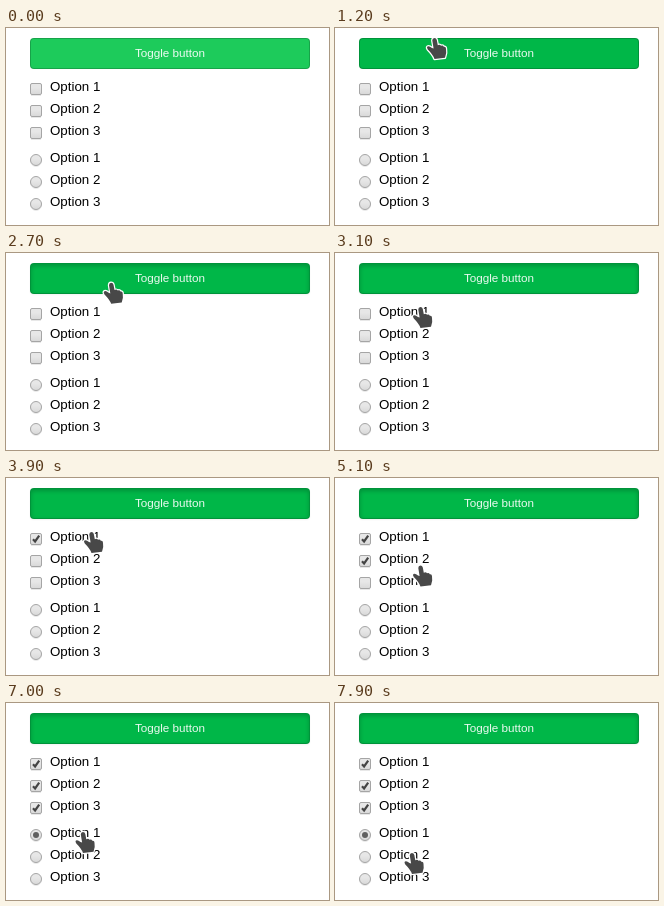
Write an HTML page that moves like this. It is 323x197 px and loops after 8 s.

```html
<!DOCTYPE html>
<html lang="en">
<head>
<meta charset="utf-8">
<title>Toggle controls</title>
<style>
  html, body { margin: 0; width: 100%; height: 100%; overflow: hidden; background: #fff; }
  #button {
    position: absolute; left: 24px; top: 10px; width: 280px; height: 31px;
    box-sizing: border-box; border: 1px solid rgba(0,0,0,.2); border-radius: 4px; background: #1dcb5b;
  }
  #button.hover { background-color: #00b748; }
  #button.down { box-shadow: inset 0 2px 4px rgba(0,0,0,.2), 0 1px 2px rgba(0,0,0,.05); }
  svg { position: absolute; left: 0; top: 0; width: 323px; height: 197px; }
  text { font: 13.333px "Liberation Sans", Arial, sans-serif; }
  #caption { font-size: 11.7px; fill: #fff; fill-opacity: .92; text-anchor: middle; }
  .face { fill: url(#idle); stroke: #a5a5a5; }
  .shade { fill: none; stroke: #000; stroke-opacity: .09; }
  .pressed .face { fill: url(#active); stroke: #999; }
  .mark { visibility: hidden; }
  .checked .mark { visibility: visible; }
</style>
</head>
<body>
<div id="button"></div>
<svg viewBox="0 0 323 197">
  <defs>
    <linearGradient id="idle" x2="0" y2="1">
      <stop offset=".38" stop-color="#e7e7e7"/><stop offset="1" stop-color="#d8d8d8"/>
    </linearGradient>
    <linearGradient id="active" x2="0" y2="1">
      <stop offset=".38" stop-color="#dddddd"/><stop offset="1" stop-color="#cdcdcd"/>
    </linearGradient>
  </defs>
  <text id="caption" x="164" y="29">Toggle button</text>
  <g id="options"></g>
  <path id="hand" fill="#484848" stroke="#fff" stroke-width="2.4" stroke-linejoin="round" paint-order="stroke"
    d="M-.6 0Q1.4 0 1.8 2L2.8 7.2Q5 6.2 6 7.8Q8 7 8.8 8.8Q11 8.4 11 10.8L11.2 15L10 19.8L-.5 21Q-2 16.8 -7.2 11.6Q-8.6 9.6 -7.6 8.6Q-6 7.4 -3 10L-1.4 10.6L-2.7 2.5Q-2.7 .2 -.6 0Z"/>
</svg>
<script>
const LOOP = 8000, TICK = 100, PRESS_DELAY = 200;

// The pointer enters, rests on the button, then visits the options in order.
const entry = { x: 100, y: 10 };
const stops = [
  { start: 1200, end: 1500, x: 108, y: 27 },
  { start: 2600, end: 3100, x: 86, y: 54, check: 3900 },
  { start: 4000, end: 4200, x: 86, y: 79, check: 4600 },
  { start: 5000, end: 5200, x: 86, y: 96, check: 5700 },
  { start: 6300, end: 6500, x: 77.5, y: 129, check: 6900 },
  { start: 7500, end: 7900, x: 77.5, y: 150, check: LOOP }
];

const $ = id => document.getElementById(id);

const checkbox = `
  <path class="shade" d="M25 6.5H35"/>
  <rect class="face" x="24.5" y="-5.5" width="11" height="11" rx="1.5"/>
  <path class="mark" d="M27 .2L29.1 2.5L33.2 -3.3" fill="none" stroke="#444" stroke-width="2.2"/>`;

const radio = `
  <circle class="shade" cx="30" cy="1" r="5.5"/>
  <circle class="face" cx="30" r="5.5"/>
  <circle class="mark" cx="30" r="3" fill="#606060"/>`;

function option(i) {
  const isRadio = i >= 3;
  return `<g transform="translate(0 ${61 + 22 * i + (isRadio ? 5 : 0)})">
    ${isRadio ? radio : checkbox}<text x="44" y="2">Option ${i % 3 + 1}</text></g>`;
}

$("options").innerHTML = Array.from({ length: 6 }, (_, i) => option(i)).join("");
const groups = [...$("options").children];

const ease = p => p * p * (3 - 2 * p);

function pointerAt(t) {
  let { x, y } = entry;
  for (const stop of stops) {
    const p = ease(Math.min(1, Math.max(0, (t - stop.start) / (stop.end - stop.start))));
    x += (stop.x - x) * p;
    y += (stop.y - y) * p;
  }
  return `translate(${x} ${y})`;
}

function render(time) {
  const t = Math.floor(time / TICK) * TICK;
  const entered = t >= stops[0].start;
  $("button").classList.toggle("hover", entered);
  $("button").classList.toggle("down", t >= 1900);
  groups.forEach((group, i) => {
    const visit = stops[i + 1];
    const checked = !!visit && t >= visit.check;
    group.classList.toggle("checked", checked);
    group.classList.toggle("pressed", !!visit && !checked && t >= visit.end + PRESS_DELAY);
  });
  $("hand").style.display = entered ? "" : "none";
  $("hand").setAttribute("transform", pointerAt(t));
}

const start = performance.now();
function tick(now) {
  render(Math.max(0, now - start) % LOOP);
  requestAnimationFrame(tick);
}
render(0);
requestAnimationFrame(tick);
</script>
</body>
</html>
```
